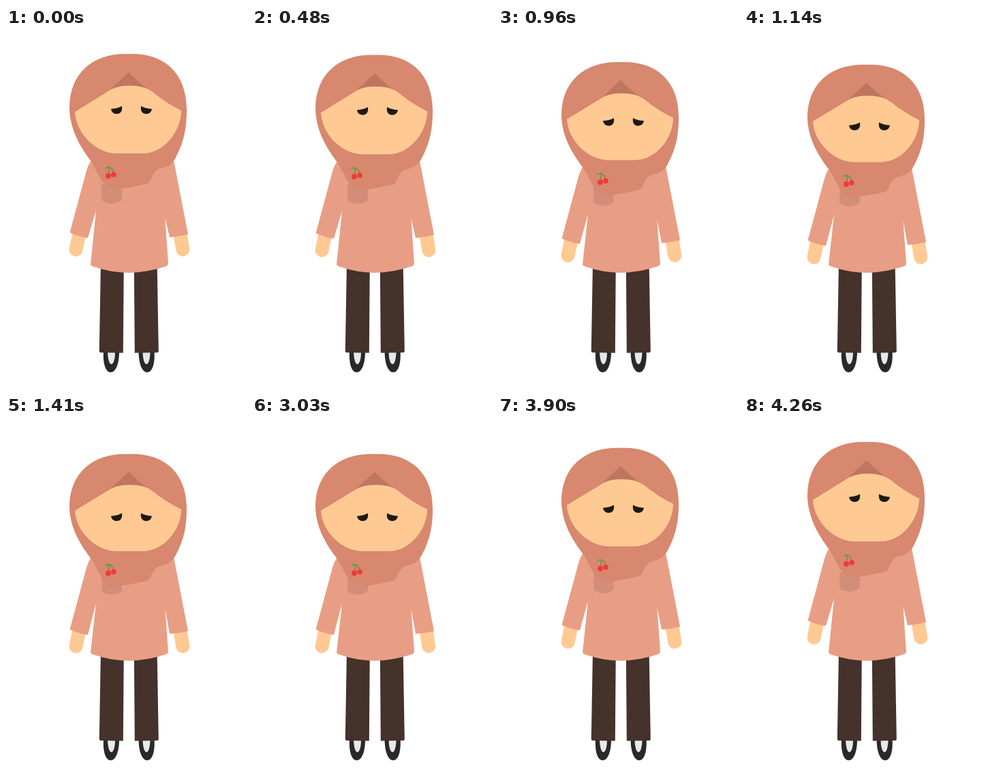
An HTML page with a canvas for the animation above (4500 ms loop, 352 by 528 pixels).

```html
<!DOCTYPE html>
<html lang="en">
<head>
<meta charset="utf-8">
<title>Breathing character</title>
<style>
html, body { margin: 0; width: 100%; height: 100%; overflow: hidden; background: #fff; }
canvas { display: block; width: 100vw; height: 100vh; }
</style>
</head>
<body>
<canvas id="stage" width="352" height="528"></canvas>
<script>
const ctx = document.getElementById('stage').getContext('2d');
const LOOP = 4500, STEP = 30;
const COLORS = {
  scarf: '#d7886e', fold: '#bf7661', skin: '#ffc993', shirt: '#e89e85', pocket: '#d28e79',
  trousers: '#44322b', shoe: '#292929', sock: '#e9e8e8', eye: '#1d1912',
  cherry: '#ef3a3b', stem: '#5f9b3c'
};

const ease = (t, start, end) => {
  const u = Math.min(1, Math.max(0, (t - start) / (end - start)));
  return (1 - Math.cos(Math.PI * u)) / 2;
};

function fill(color, path) {
  ctx.fillStyle = color;
  ctx.fill(new Path2D(path));
}

function stroke(color, width, path) {
  ctx.strokeStyle = color;
  ctx.lineWidth = width;
  ctx.lineCap = 'round';
  ctx.stroke(new Path2D(path));
}

function dot(x, y, r, color) {
  ctx.fillStyle = color;
  ctx.beginPath();
  ctx.arc(x, y, r, 0, Math.PI * 2);
  ctx.fill();
}

function group(draw, dy = 0, scaleY = 1) {
  ctx.save();
  ctx.transform(1, 0, 0, scaleY, 0, dy);
  draw();
  ctx.restore();
}

function mirrored(axis, draw) {
  draw();
  ctx.save();
  ctx.transform(-1, 0, 0, 1, axis * 2, 0);
  draw();
  ctx.restore();
}

function legs() {
  mirrored(180.3, () => {
    fill(COLORS.shoe, 'M143 475C142 492 146 505 153.5 505C161 505 166 492 166 475Z');
    fill(COLORS.sock, 'M149 475H160C160 486 157.5 493 154.5 493C151.5 493 149.5 486 149 475Z');
    fill(COLORS.trousers, 'M139 345L136.8 474Q137 476 139 476L171.8 476.5L172.8 345Z');
  });
}

function body(drop) {
  group(() => {
    stroke(COLORS.skin, 20, 'M108.2 298L102.6 325');
    stroke(COLORS.skin, 20, 'M254.8 298L259.2 325');
  }, 12.7 * drop);

  const y = (base, shift) => base + shift * drop;
  fill(COLORS.shirt, `M126 ${y(193, 13)} Q120 ${y(200, 13)} 116.5 ${y(215, 13)}
    L93.6 ${y(300, 13)} Q106 ${y(306, 13)} 120 ${y(308, 13)}
    L132 ${y(268, 7)} L124 347 Q125 349 130 350.5 Q181 368 236 349
    L238 346 L233.4 ${y(279, 4)} L240 ${y(307, 12.5)} Q254 ${y(306, 13)} 267 ${y(302.5, 13)}
    L246 ${y(194, 13)} Z`);
  group(() => fill(COLORS.pocket, 'M140 229H170V252Q156 263 140.5 253Z'), 4.5 * drop);
}

function cherries() {
  stroke(COLORS.stem, 1.6, 'M150 216Q152 209 151 204Q157 206 158 213M146.5 205.5Q149 203 152 205');
  dot(150, 217, 4, COLORS.cherry);
  dot(158, 215, 3.8, COLORS.cherry);
}

function head() {
  fill(COLORS.scarf, `M186 38H174C130 38 93 64 93 118C94 148 107 172 126 197L140 223.5
    Q148 233 156 237Q182 235 208 228Q211 226 214 218Q218 209 226 206Q242 204 249 190
    C262 165 265 145 265 120C265 64 230 38 186 38Z`);
  fill(COLORS.fold, 'M180 65L149 94H214Q194 80 180 65Z');
  fill(COLORS.skin, `M101 123L148 94Q160 84.5 181 84.5Q203 84.5 214 93Q236 111 257 121
    C257 152 231 184 201 184H162C133 184 103 156 101 123Z`);
  cherries();
}

function eyes() {
  mirrored(184, () =>
    fill(COLORS.eye, 'M154 118.7Q163 118.3 170 114.5C171 122 168 126 162.5 126C158 126 155 123.5 154 118.7Z'));
}

function render(t) {
  const rising = t >= 3550;
  const phase = rising ? ease(t, 3550, 4250) : ease(t, 280, 1380);
  const lagged = phase ** 1.6;
  const drop = rising ? 1 - phase : phase;
  const eyeDrop = rising ? 1 - lagged : lagged;

  ctx.fillStyle = '#fff';
  ctx.fillRect(0, 0, 352, 528);
  legs();
  body(drop);
  const squash = 0.0236 * drop;
  group(head, drop * 13 + squash * 237, 1 - squash);
  group(eyes, drop * 16 + eyeDrop * 12);
}

function tick() {
  const t = performance.now() % LOOP;
  render(Math.floor(t / STEP) * STEP);
  requestAnimationFrame(tick);
}
tick();
</script>
</body>
</html>
```
